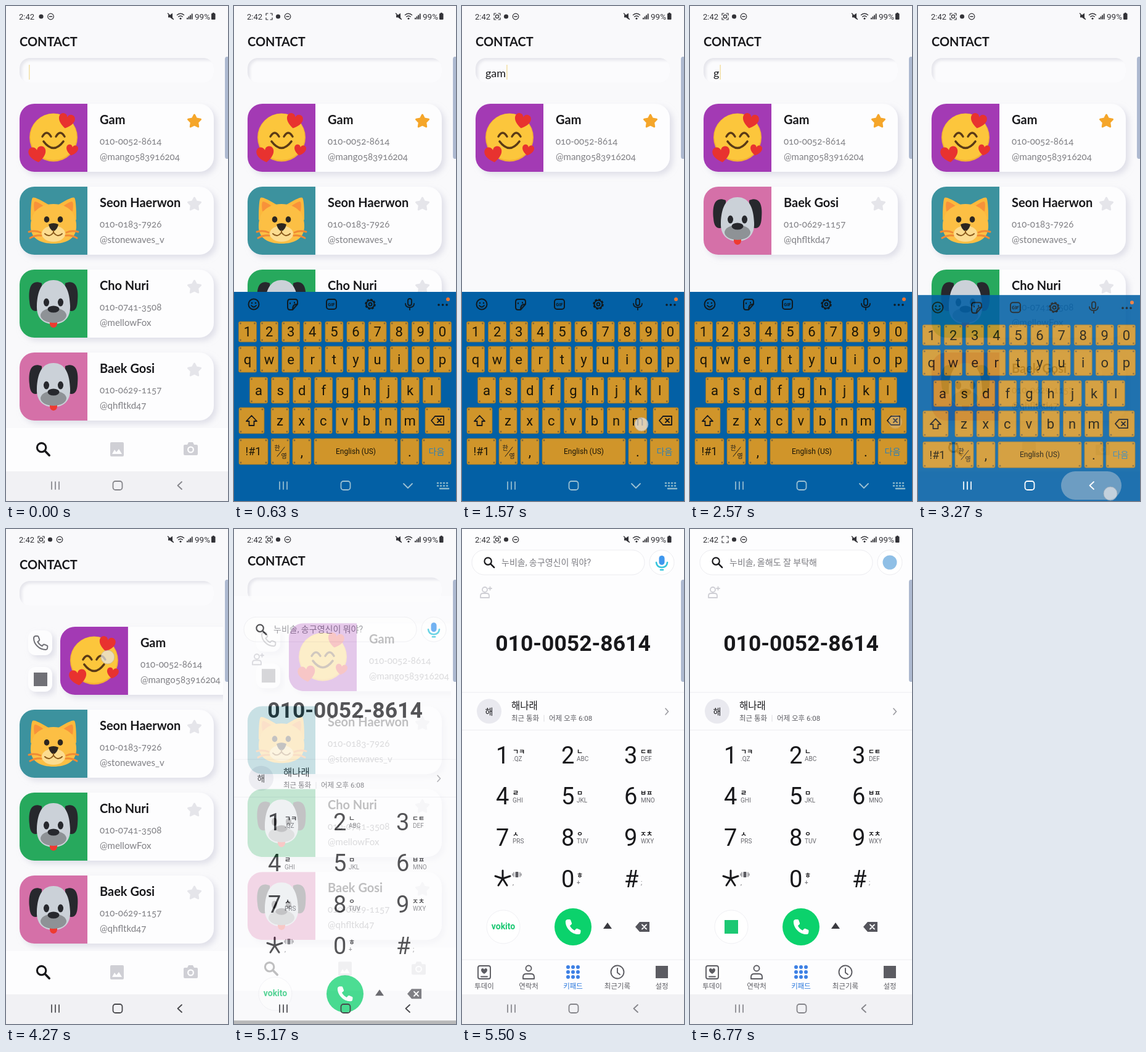
Recreate the animation shown at these times as an HTML page. Size 360 px wide and 800 px high, loop 6810 ms.

```html
<!DOCTYPE html>
<html lang="ko">
<head>
<meta charset="utf-8">
<title>Contacts</title>
<style>
  html, body { margin: 0; width: 100%; height: 100%; overflow: hidden; background: #000; }
  svg { display: block; width: 360px; height: 800px; }
  .app { font-family: Lato, "Open Sans", sans-serif; font-feature-settings: "onum"; }
  .ui { font-family: Roboto, "Noto Sans CJK KR", "Noto Sans CJK", sans-serif; }
  .mid { text-anchor: middle; }
  .bold { font-weight: 700; }
  .line { fill: none; stroke-linecap: round; stroke-linejoin: round; }
</style>
</head>
<body>
<svg id="stage" viewBox="0 0 360 800"></svg>
<script>
const LOOP = 6810;
const BG = '#f9f9fb', PANEL = '#fdfdfe', NAV = '#f1f1f4', EDGE = '#ececf0';
const INK = '#18181b', SOFT = '#808085', PALE = '#e5e5ea', ICON = '#cfcfd5', GRAY = '#5c5c62';

const people = [
  { name: 'Gam', phone: '010-0052-8614', handle: '@mango583916204', color: '#a33ab4', face: smiley, star: '#f5a62a' },
  { name: 'Seon Haerwon', phone: '010-0183-7926', handle: '@stonewaves_v', color: '#3c929e', face: cat, star: PALE },
  { name: 'Cho Nuri', phone: '010-0741-3508', handle: '@mellowFox', color: '#27a95d', face: dog, star: PALE },
  { name: 'Baek Gosi', phone: '010-0629-1157', handle: '@qhfltkd47', color: '#d570a8', face: dog, star: PALE }
];

// drawing helpers
const text = (x, y, size, fill, s, cls = 'ui', extra = '') =>
  `<text x="${x}" y="${y}" font-size="${size}" fill="${fill}" class="${cls}" ${extra}>${s}</text>`;
const rect = (x, y, w, h, r, fill, extra = '') =>
  `<rect x="${x}" y="${y}" width="${w}" height="${h}" rx="${r}" fill="${fill}" ${extra}/>`;
const circle = (x, y, r, fill, extra = '') =>
  `<circle cx="${x}" cy="${y}" r="${r}" fill="${fill}" ${extra}/>`;
const oval = (x, y, rx, ry, fill) =>
  `<ellipse cx="${x}" cy="${y}" rx="${rx}" ry="${ry}" fill="${fill}"/>`;
const path = (d, fill, extra = '') => `<path d="${d}" fill="${fill}" ${extra}/>`;
const line = (d, color, w = 2, extra = '') =>
  `<path class="line" d="${d}" stroke="${color}" stroke-width="${w}" ${extra}/>`;
const at = (x, y, body, more = '') => `<g transform="translate(${x} ${y}) ${more}">${body}</g>`;
const group = (id, body, extra = '') => `<g id="${id}" ${extra}>${body}</g>`;

function heart(x, y, s, turn) {
  const d = 'M0 .45C-.7 .05-.55-.45-.25-.45Q-.06-.45 0-.25Q.06-.45 .25-.45C.55-.45 .7 .05 0 .45Z';
  return at(x, y, path(d, '#e8322f'), `rotate(${turn}) scale(${s})`);
}

function star(x, y, r, color) {
  const pts = Array.from({ length: 10 }, (_, i) => {
    const a = i * Math.PI / 5 - Math.PI / 2, q = i % 2 ? r * .52 : r;
    return (x + q * Math.cos(a)).toFixed(1) + ',' + (y + q * Math.sin(a)).toFixed(1);
  });
  return `<polygon points="${pts.join(' ')}" fill="${color}" stroke="${color}" stroke-width="3" stroke-linejoin="round"/>`;
}

const handset = (x, y, s, fill, extra = '') => at(x, y, path(
  'M-8-11L-5-11Q-4-11-3.5-10L-1.8-5.5Q-1.5-4.4-2.4-3.6L-4.6-1.7Q-2 3.2 2.5 5.2L4.4 3Q5.2 2.2 6.2 2.6L10.5 4.4Q11.5 5 11.4 6L11 9Q10.4 11 8 11C-2 11-11 2-11-7.5Q-11-10.6-8-11Z',
  fill, extra), `scale(${s})`);
const lens = (x, y, s, color, w) =>
  at(x, y, `<circle cx="-2" cy="-2" r="6" fill="none" stroke="${color}" stroke-width="${w}"/>` + line('M3 3L8.5 8.5', color, w + .4), `scale(${s})`);

function smiley() {
  return circle(55, 54.5, 39, '#f4b034') + circle(55, 53.5, 37.5, '#fcc63c') +
    [44, 66].map(x => line(`M${x - 7} 53Q${x} 41 ${x + 7} 53`, '#5a3a16', 3.4)).join('') +
    line('M39 61Q55 82 71 61', '#5a3a16', 3.6) +
    heart(76, 28, 26, 12) + heart(29, 82, 28, -8) + heart(85, 75, 19, 10);
}

function cat() {
  const ear = path('M18 54Q18 22 21 18Q24 15 50 31Z', '#fcb93c') + path('M24 40Q22 25 25 24Q29 24 40 32Z', '#f8923a');
  return ear + at(110, 0, ear, 'scale(-1 1)') +
    path('M55 28C80 28 93 44 92 66C91 84 76 92 55 92C34 92 19 84 18 66C17 44 30 28 55 28Z', '#fcbf44') +
    oval(55, 76, 19, 13, '#fcdc90') +
    oval(44, 53, 4.3, 5, '#2c2620') + oval(66, 53, 4.3, 5, '#2c2620') +
    path('M47 61Q55 57 63 61Q61 70 55 72Q49 70 47 61Z', '#2c2620') +
    line('M55 71V74Q48 83 41 76M55 74Q62 83 69 76', '#8a5a1c', 2) +
    line('M15 73Q25 70 34 74M17 83Q26 78 35 79M95 73Q85 70 76 74M93 83Q84 78 75 79', '#f08a34', 3);
}

function dog() {
  return path('M36 22C18 15 14 31 16 51Q17 68 27 67Q36 65 37 45ZM74 22C92 15 96 31 94 51Q93 68 83 67Q74 65 73 45Z', '#27282d') +
    path('M55 17C75 17 81 36 82 58C83 78 72 88 55 88C38 88 27 78 28 58C29 36 35 17 55 17Z', '#cbd1d8') +
    path('M49 84Q55 81 61 84Q62 93 55 94Q48 93 49 84Z', '#ee3a30') +
    oval(55, 74, 21, 12, '#8e9296') + oval(55, 64, 9.5, 5.5, '#27282d') +
    oval(43.5, 53, 4.5, 6.5, '#27282d') + oval(66.5, 53, 4.5, 6.5, '#27282d');
}

function card(p, i) {
  return group('card' + i,
    rect(0, 0, 315, 110, 24, PANEL, 'filter="url(#lift)"') +
    `<g clip-path="url(#round)">${rect(0, 0, 110, 110, 0, p.color)}</g>` + p.face() +
    text(130, 33, 20, INK, p.name, 'app bold') +
    text(130, 66, 15, SOFT, p.phone, 'app') + text(130, 91, 15, SOFT, p.handle, 'app') +
    star(283.5, 28.5, 10.5, p.star));
}

function contacts() {
  const swipe = [184, 243].map(y => rect(36, y - 20, 39, 40, 12, PANEL, 'filter="url(#lift)"')).join('') +
    handset(56, 184, 1, 'none', 'stroke="#707076" stroke-width="2"') + rect(45, 232, 22, 22, 0, '#707076');
  const field = `<g clip-path="url(#field)">${rect(22, 84, 315, 40, 16, '#e6e6ec')}${rect(26, 88, 330, 60, 14, '#fbfbfd', 'filter="url(#blur)"')}</g>`;
  const tabs = rect(0, 682, 360, 70, 0, PANEL) + lens(60, 716, 1.2, INK, 2.6) +
    path('M171 705H189Q191 705 191 707V726Q191 728 189 728H171Q169 728 169 726V707Q169 705 171 705ZM172 724H188L183 716L179 721L176 717Z', ICON, 'fill-rule="evenodd"') +
    path('M290 709H294L296 705H303L305 709H309Q311 709 311 711V724Q311 726 309 726H290Q288 726 288 724V711Q288 709 290 709Z', ICON) +
    circle(299.5, 717, 5.5, PANEL) + circle(299.5, 717, 3.2, ICON);
  return rect(0, 0, 360, 800, 0, BG) +
    text(22, 65, 20, INK, 'CONTACT', 'app bold') + field +
    text(38, 115, 18, INK, '', 'app', 'id="query"') + rect(38, 95, 1.5, 24, 0, '#f2dfa4', 'id="caret"') +
    group('actions', swipe) +
    `<g clip-path="url(#list)">${people.map(card).join('')}</g>` +
    tabs + rect(0, 752, 360, 48, 0, NAV);
}

// keyboard
const rowX = (x, n) => Array.from({ length: n }, (_, i) => x + i * 35.1);
function key(x, y, w, h, label = '', size = 22, color = '#1b1608') {
  const studs = [[3, 3], [w - 3, 3], [3, h - 3], [w - 3, h - 3]]
    .map(([a, b]) => circle(x + a, y + b, 1.4, '#80683a')).join('');
  return rect(x, y, w, h, 2.5, '#d0952a', 'stroke="#94742c" stroke-width=".8"') + studs +
    text(x + w / 2, y + h / 2 + size * .36, size, color, label, 'ui mid');
}
const keyRow = (chars, x, y, h) =>
  rowX(x, chars.length).map((k, i) => key(k - 14.5, y, 29, h, chars[i])).join('');

function keyboard() {
  const ink = '#101a20';
  const ring = (x, r) => circle(x, 482, r, 'none', `stroke="${ink}" stroke-width="2"`);
  const box = x => rect(x - 8, 474, 16, 16, 4, 'none', `stroke="${ink}" stroke-width="2"`);
  const gear = circle(221, 482, 7.3, 'none', `stroke="${ink}" stroke-width="3" stroke-dasharray="3.4 2.33"`) + ring(221, 6.5) + ring(221, 2.5);
  const hide = [0, 1, 2].map(r =>
    line(`M${330 + (r === 2 ? 4 : 0)} ${771 + r * 4.5}H348`, '#8db9cc', 2.5, r < 2 ? 'stroke-dasharray="1 4"' : '')).join('');
  return rect(0, 462, 360, 338, 0, '#0360a5') +
    ring(32, 8.5) + circle(29, 480, 1.3, ink) + circle(35, 480, 1.3, ink) + line('M28 484Q32 489 36 484', ink, 1.8) +
    line('M103 482V478Q103 474 99 474H91Q87 474 87 478V487Q87 491 91 491H95L103 482Q95 481 95 491M91 480V481M98 479V480', ink) +
    box(158) + text(158, 485, 7.5, ink, 'GIF', 'ui mid bold') + gear +
    rect(282, 473, 6, 11, 3, 'none', `stroke="${ink}" stroke-width="1.8"`) + line('M278 481Q278 487 285 487Q292 487 292 481M285 487V491', ink, 1.8) +
    [332, 338.5, 345].map(x => circle(x, 483, 1.8, ink)).join('') + circle(347, 474, 3, '#ee7430') +
    keyRow('1234567890', 22, 510, 33) + keyRow('qwertyuiop', 22, 550, 42) +
    keyRow('asdfghjkl', 40, 600, 42) + keyRow('zxcvbnm', 74.5, 649, 42) +
    key(8, 649, 41, 42) + line('M28.5 662L20 671H24.5V678H32.5V671H37Z', INK, 1.8) +
    key(310, 649, 41, 42) + line('M320 670L326 663H340V677H326ZM330 667L336 673M336 667L330 673', INK, 1.8) +
    key(8, 699, 47, 42, '!#1', 18) + key(60, 699, 30, 42) +
    text(70, 718, 10, INK, '한', 'ui mid') + text(81, 731, 10, INK, '영', 'ui mid') + line('M70 728L82 713', INK, 1) +
    key(95, 699, 30, 42, ',') + key(130, 699, 135, 42, 'English (US)', 12) +
    key(270, 699, 30, 42, '.') + key(305, 699, 47, 42, '다음', 14, '#2c80b8') +
    group('hide', hide);
}

// dialer
function dialer() {
  const pad = [['1', 'ㄱㅋ', '.QZ'], ['2', 'ㄴ', 'ABC'], ['3', 'ㄷㅌ', 'DEF'], ['4', 'ㄹ', 'GHI'], ['5', 'ㅁ', 'JKL'], ['6', 'ㅂㅍ', 'MNO'],
    ['7', 'ㅅ', 'PRS'], ['8', 'ㅇ', 'TUV'], ['9', 'ㅈㅊ', 'WXY'], ['', '', ','], ['0', 'ㅎ', '+'], ['#', '', ';']];
  const keys = pad.map(([n, ko, en], i) => {
    const c = i % 3, y = 365 + Math.floor(i / 3) * 66.7;
    return text([55, 161, 263][c], y + 13.5, 38, INK, n) +
      text([82, 186, 289][c], y - 1, 11, INK, ko, 'ui bold') + text([82, 186, 290][c], y + 10, 10, '#68686e', en);
  }).join('');
  const tabs = ['투데이', '연락처', '키패드', '최근기록', '설정']
    .map((s, i) => text(36 + i * 72, 743, 11.5, i === 2 ? '#2b78dd' : GRAY, s, 'ui mid')).join('');
  const dots = Array.from({ length: 9 }, (_, i) =>
    circle(172 + i % 3 * 8, 708 + Math.floor(i / 3) * 8, 3, '#3d80e4')).join('');
  const stroke = `stroke="${GRAY}" stroke-width="1.9"`;
  return rect(0, 0, 360, 800, 0, PANEL) +
    rect(16, 34, 280, 40, 20, '#fff', `stroke="${EDGE}"`) + lens(44, 54, .95, INK, 2.3) +
    text(64, 59, 14, '#7c7c82', '누비솔, 송구영신이 뭐야?', 'ui', 'id="ask0"') +
    text(64, 59, 14, '#7c7c82', '누비솔, 올해도 잘 부탁해', 'ui', 'id="ask1"') +
    circle(324, 54, 20, '#fff', `stroke="${EDGE}"`) +
    group('mic', rect(319.5, 43, 9, 15, 4.5, '#3f97ee') + line('M315 54Q316 62 324 62Q332 62 333 54', '#36c5dc', 2.6) + line('M322 66H326', '#36c5dc', 2.6)) +
    circle(324, 54, 11.5, '#8fbfe6', 'id="orb"') +
    circle(37, 98, 4, 'none', `stroke="${ICON}" stroke-width="1.8"`) + line('M30 111V108Q30 104 34 104H40Q44 104 44 108V111ZM43 96H48M45.5 93.5V98.5', ICON, 1.8) +
    text(180, 197, 35.5, INK, people[0].phone, 'ui mid bold') +
    line('M0 264H360M0 325H360M0 696H360', EDGE, 1) +
    circle(44, 294.5, 20, '#e9e9ef') + text(44, 299.5, 14, INK, '해', 'ui mid') +
    text(80, 291, 15.5, INK, '해나래', 'ui', 'font-weight="500"') +
    text(80, 310, 11.5, GRAY, '최근 통화') + line('M133 301V311', '#dcdce0', 1) + text(141, 310, 11.5, GRAY, '어제 오후 6:08') +
    line('M330 290L334.5 295L330 300', '#98989e', 1.6) +
    keys + line('M66 565V552M66 565L54 561M66 565L78 561M66 565L59 576M66 565L73 576', INK, 3) +
    rect(86.5, 554, 5, 9, 1, GRAY) + line('M84 555V562M94 555V562M82 557V560M96 557V560', GRAY, 1) +
    circle(67, 643, 27, '#fff', 'stroke="#f0f0f4"') +
    text(67, 647, 14, '#1cc873', 'vokito', 'ui mid bold', 'id="word"') + rect(56, 632, 22, 22, 0, '#1cc873', 'id="mark"') +
    circle(180, 643, 30, '#0bd26c') + handset(180, 643, 1.1, '#fff') +
    path('M229 646L236 636L243 646Z', '#3a3a40') +
    path('M281 643L288 635H304V651H288Z', '#55555c') + line('M292 639.5L299 646.5M299 639.5L292 646.5', '#fff', 1.8) +
    line('M29 706H43Q46 706 46 709V724Q46 727 43 727H29Q26 727 26 724V709Q26 706 29 706ZM31 723.5H41', GRAY, 1.9) +
    at(36, 714.5, path('M0 4.5C-7 .5-5.5-4.5-2.5-4.5Q-.6-4.5 0-2.5Q.6-4.5 2.5-4.5C5.5-4.5 7 .5 0 4.5Z', GRAY)) +
    circle(108, 710, 4.5, 'none', stroke) + line('M99 727V724Q99 719 104 719H112Q117 719 117 724V727Z', GRAY, 1.9) +
    dots + circle(252, 716, 10.5, 'none', stroke) + line('M252 710V717L256 720', GRAY, 1.9) +
    rect(314, 706, 20, 20, 0, GRAY) + tabs + rect(0, 752, 360, 48, 0, NAV);
}

function statusBar() {
  const c = '#333338';
  return text(21, 21.5, 13, c, '2:42') +
    group('capture', line('M52 15V12H55M59 12H62V15M62 19V22H59M55 22H52V19', c, 1.2) + circle(57, 17, 2.6, 'none', `id="dot" stroke="${c}" stroke-width="1.3"`)) +
    group('notes', circle(57, 17, 3.6, c) + circle(72.5, 17, 4.8, 'none', `stroke="${c}" stroke-width="1.2"`) + line('M70.3 17H74.7', c, 1.3)) +
    path('M263 14.5H266L270 11.5V21.5L266 18.5H263Z', c) + line('M262.5 12L271.5 21.5', c, 1.4) +
    line('M277.5 14.5Q283 10 288.5 14.5M279.8 17.3Q283 14.6 286.2 17.3', c, 1.5) + circle(283, 20.2, 1.5, c) +
    [0, 1, 2, 3].map(i => rect(293 + i * 2.6, 19 - i * 2.2, 1.8, 2.5 + i * 2.2, 0, c)).join('') +
    text(306, 21.5, 13.5, c, '99%') + rect(333, 12, 6.5, 10, 1, c) + rect(334.8, 10.8, 3, 2, 0, c);
}

const nav = line('M74 769V781M80 769V781M86 769V781', 'currentColor', 1.7) +
  rect(173.5, 768, 15, 14, 4, 'none', 'stroke="currentColor" stroke-width="1.8"') +
  line('M285 769L278.5 775L285 781', 'currentColor', 1.8, 'id="back"') +
  line('M275 772L282 779L289 772', 'currentColor', 1.8, 'id="down"');

document.getElementById('stage').innerHTML = `<defs>
  <filter id="lift" x="-20%" y="-20%" width="140%" height="150%"><feDropShadow dx="5" dy="5" stdDeviation="5" flood-color="#c6c6d6" flood-opacity=".5"/></filter>
  <filter id="blur"><feGaussianBlur stdDeviation="2"/></filter>
  <clipPath id="round"><rect width="315" height="110" rx="24"/></clipPath>
  <clipPath id="field"><rect x="22" y="84" width="315" height="40" rx="16"/></clipPath>
  <clipPath id="list"><rect y="130" width="352" height="552"/></clipPath></defs>` +
  group('contacts', contacts()) + group('keyboard', keyboard()) + group('dialer', dialer()) +
  rect(232, 752, 98, 46, 23, '#ccd2da', 'id="ripple"') + group('nav', nav) + statusBar() +
  path('M360 82H358Q355 82 355 86V243Q355 247 358 247H360Z', '#adb9d0') +
  circle(0, 0, 11, '#e6e6e8', 'id="touch" stroke="#b0b0b4" stroke-width=".8"');

const el = {};
document.querySelectorAll('[id]').forEach(n => { el[n.id] = n; });

// motion
const clamp = v => Math.max(0, Math.min(1, v));
const span = (t, a, b) => clamp((t - a) / (b - a));
const out = p => 1 - (1 - p) * (1 - p);
const fade = (id, v) => el[id].setAttribute('opacity', v);
const show = (id, on) => { el[id].style.display = on ? '' : 'none'; };
const move = (id, x, y) => el[id].setAttribute('transform', `translate(${x} ${y})`);

const typing = [[0, ''], [900, 'g'], [1170, 'ga'], [1440, 'gam'], [2100, 'ga'], [2350, 'g'], [2600, '']];
const fingerX = t => 99 + 91 * span(t, 4090, 4340);
const taps = [
  [30, 150, 140, 104], [860, 970, 180, 622], [1130, 1240, 40, 622], [1400, 1640, 291, 676],
  [2060, 2160, 333, 672], [2310, 2410, 333, 672], [2560, 2660, 333, 672],
  [3110, 3380, 312, 788], [4070, 4560, fingerX, 207], [4900, 5040, 58, 186]
];

function render(t) {
  const [edited, query] = typing.filter(([when]) => t >= when).pop();
  el.query.textContent = query;
  show('caret', (t - edited) % 1000 < 500);
  el.caret.setAttribute('x', 37 + (query ? el.query.getComputedTextLength() + 2 : 0));

  const opening = span(t, 150, 400), closing = span(t, 3235, 3430);
  const kb = out(opening) * (1 - closing ** 1.25);
  show('keyboard', kb > 0);
  fade('keyboard', kb);
  move('keyboard', 0, 30 * (1 - out(opening)) + 28 * closing);

  const drag = Math.max(0, Math.min(67, fingerX(t) - 99));
  let slot = 0;
  people.forEach((p, i) => {
    const hit = p.name.toLowerCase().includes(query);
    show('card' + i, hit);
    if (hit) move('card' + i, 22 + (i ? 0 : drag), 158 + 134 * slot++);
  });
  show('actions', drag > 0);

  const p = span(t, 5100, 5500), e = out(p);
  move('contacts', 0, -18 * e);
  show('dialer', p > 0);
  move('dialer', 0, 160 * (1 - e));
  fade('dialer', clamp(p * 4.1));

  const swap = span(t, 6470, 6700);
  fade('ask0', 1 - swap);
  fade('ask1', swap);
  fade('mic', 1 - swap);
  fade('orb', swap);
  show('word', t < 6150);
  show('mark', t >= 6150);

  const capture = t >= 200;
  show('capture', capture);
  show('dot', t >= 670 && t < 6100);
  move('notes', capture ? 14.5 : 0, 0);

  const typable = t > 180 && t < 3235;
  show('back', !typable);
  show('down', typable);
  show('hide', typable);
  el.nav.style.color = typable ? '#9bc0d2' : t < 180 ? '#85858a' :
    t < 3340 ? '#fff' : t < 5400 ? '#48484c' : '#85858a';
  fade('ripple', .45 * span(t, 3110, 3220) * (1 - span(t, 3430, 3730)));

  const tap = taps.find(([a, b]) => t >= a && t < b + 120);
  show('touch', tap);
  if (tap) {
    const [a, b, x, y] = tap;
    move('touch', typeof x === 'function' ? x(t) : x, y);
    fade('touch', .72 * span(t, a - 10, a + 50) * (1 - span(t, b, b + 120)));
  }
}

const start = performance.now();
function tick() {
  render((performance.now() - start) % LOOP);
  requestAnimationFrame(tick);
}
tick();
</script>
</body>
</html>
```
